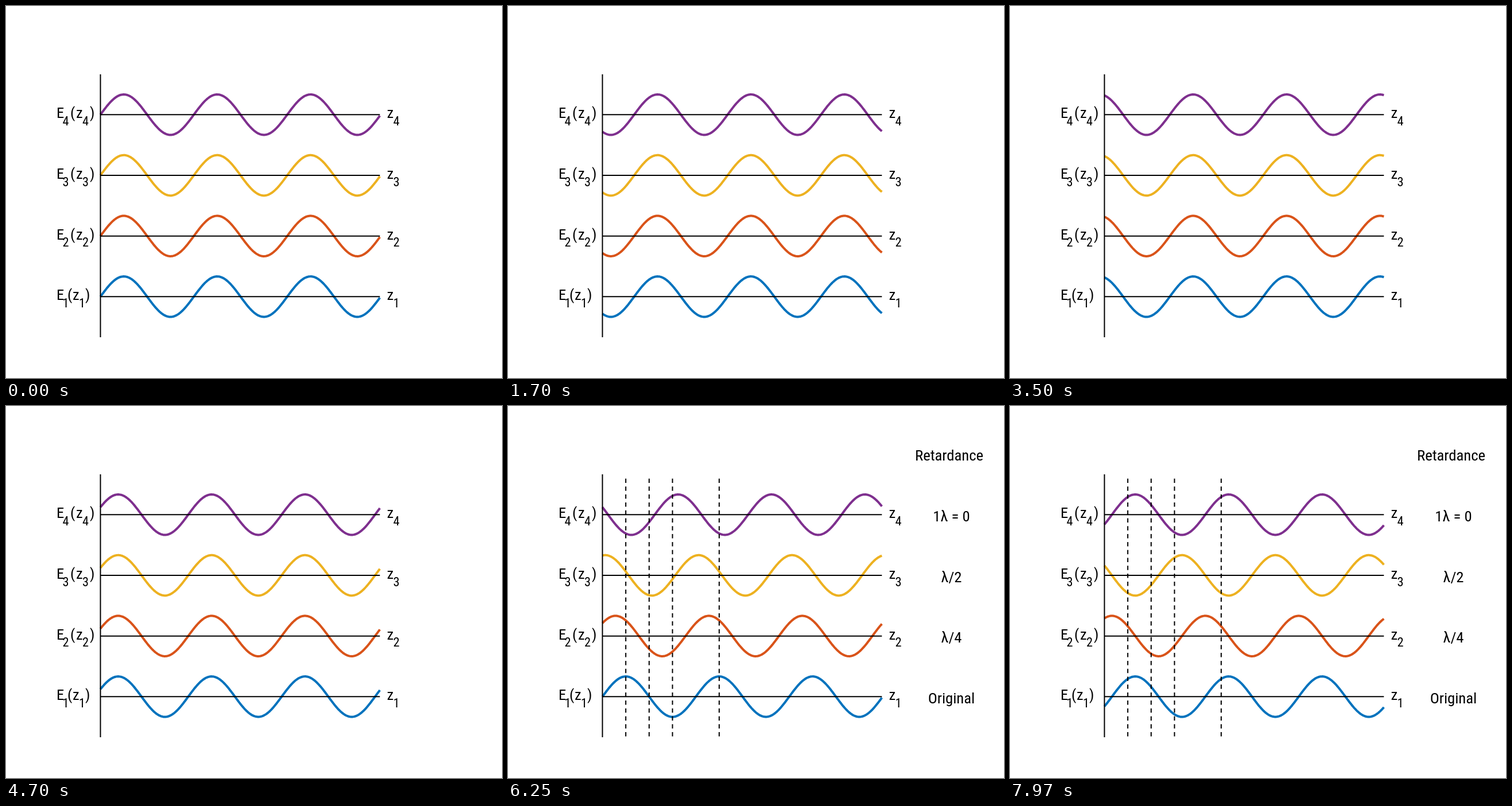
These frames come from a looping animation (864x648 px, 8 s). An HTML page with a canvas:

```html
<!DOCTYPE html>
<html lang="en">
<head>
<meta charset="utf-8">
<title>Wave retardance</title>
<style>
  html, body { margin: 0; width: 100%; height: 100%; overflow: hidden; background: #fff; }
  canvas { display: block; }
</style>
</head>
<body>
<canvas id="stage" width="864" height="648"></canvas>
<script>
const ctx = document.getElementById('stage').getContext('2d');

const LOOP = 8000;
const STEP = 100;
const LEFT = 164.5, RIGHT = 651.3;
const WAVELENGTH = 162.7, AMPLITUDE = 35.2;
const CAPTION_TIME = 5100, SHIFT_TIME = 5250, RESUME_TIME = 7670;
const SHIFT_STEPS = 25, STEPS_PER_CYCLE = 50;

const ROWS = [
  { n: 4, y: 189.3, color: '#7E2F8E', retardance: 1, caption: '1λ = 0' },
  { n: 3, y: 295, color: '#EDB120', retardance: 1 / 2, caption: 'λ/2' },
  { n: 2, y: 400.7, color: '#D95319', retardance: 1 / 4, caption: 'λ/4' },
  { n: 1, y: 506.3, color: '#0072BD', retardance: 0, caption: 'Original' }
];

const font = size => `condensed ${size}px "Roboto Condensed", Roboto, "Open Sans", sans-serif`;

// Pick the size at which the heading is 119 px wide, up to 29 px.
ctx.font = font(100);
const SIZE = Math.min(29, 100 * 119 / ctx.measureText('Retardance').width);
const SUB_SIZE = SIZE * 0.84;

function text(str, x, y, size = SIZE, align = 'left') {
  ctx.font = font(size);
  ctx.textAlign = align;
  ctx.fillStyle = '#000';
  ctx.fillText(str, x, y);
}

function line(x1, y1, x2, y2, dash = []) {
  ctx.setLineDash(dash);
  ctx.strokeStyle = '#000';
  ctx.lineWidth = 2;
  ctx.beginPath();
  ctx.moveTo(x1, y1);
  ctx.lineTo(x2, y2);
  ctx.stroke();
  ctx.setLineDash([]);
}

// Phase is measured in wavelengths; larger values move the wave right.
function wave(row, phase) {
  ctx.strokeStyle = row.color;
  ctx.lineWidth = 4;
  ctx.lineJoin = 'round';
  ctx.beginPath();
  for (let i = 0; i <= 300; i++) {
    const x = LEFT + (RIGHT - LEFT) * i / 300;
    const angle = 2 * Math.PI * ((x - LEFT) / WAVELENGTH - phase);
    ctx.lineTo(x, row.y - AMPLITUDE * Math.sin(angle));
  }
  ctx.stroke();
}

function labels({ n, y }) {
  const base = y + 6, sub = y + 18.5;
  const [open, z, index, close] = n === 1 ? [107, 116, 127, 138] : [112, 122, 133, 146];
  text('E', 88, base);
  text(n, 98.5, sub, SUB_SIZE);
  text('(', open, base);
  text('z', z, base);
  text(n, index, sub, SUB_SIZE);
  text(')', close, base);
  text('z', 663.5, base);
  text(n, 674.5, sub, SUB_SIZE);
}

const stepsSince = (t, start) => t < start ? 0 : Math.floor((t - start) / STEP) + 1;

function travelPhase(t) {
  const steps = t < STEPS_PER_CYCLE * STEP ? Math.floor(t / STEP) : stepsSince(t, RESUME_TIME);
  return steps / STEPS_PER_CYCLE;
}

function draw(t) {
  const travel = travelPhase(t);
  const shift = Math.min(SHIFT_STEPS, stepsSince(t, SHIFT_TIME)) / SHIFT_STEPS;
  const captioned = t >= CAPTION_TIME;

  ctx.fillStyle = '#fff';
  ctx.fillRect(0, 0, 864, 648);

  for (const row of ROWS) {
    wave(row, travel - shift * row.retardance);
    line(LEFT, row.y, RIGHT, row.y);
    labels(row);
    if (captioned) text(row.caption, 772.5, row.y + 11.5, SIZE, 'center');
  }
  line(LEFT, 119, LEFT, 577);

  if (captioned) {
    text('Retardance', 768.5, 95, SIZE, 'center');
    for (const quarter of [1, 2, 3, 5]) {
      const x = LEFT + quarter * WAVELENGTH / 4;
      line(x, 126.5, x, 577, [7.5, 6.3]);
    }
  }
}

function tick() {
  draw(performance.now() % LOOP);
  requestAnimationFrame(tick);
}
tick();
</script>
</body>
</html>
```
